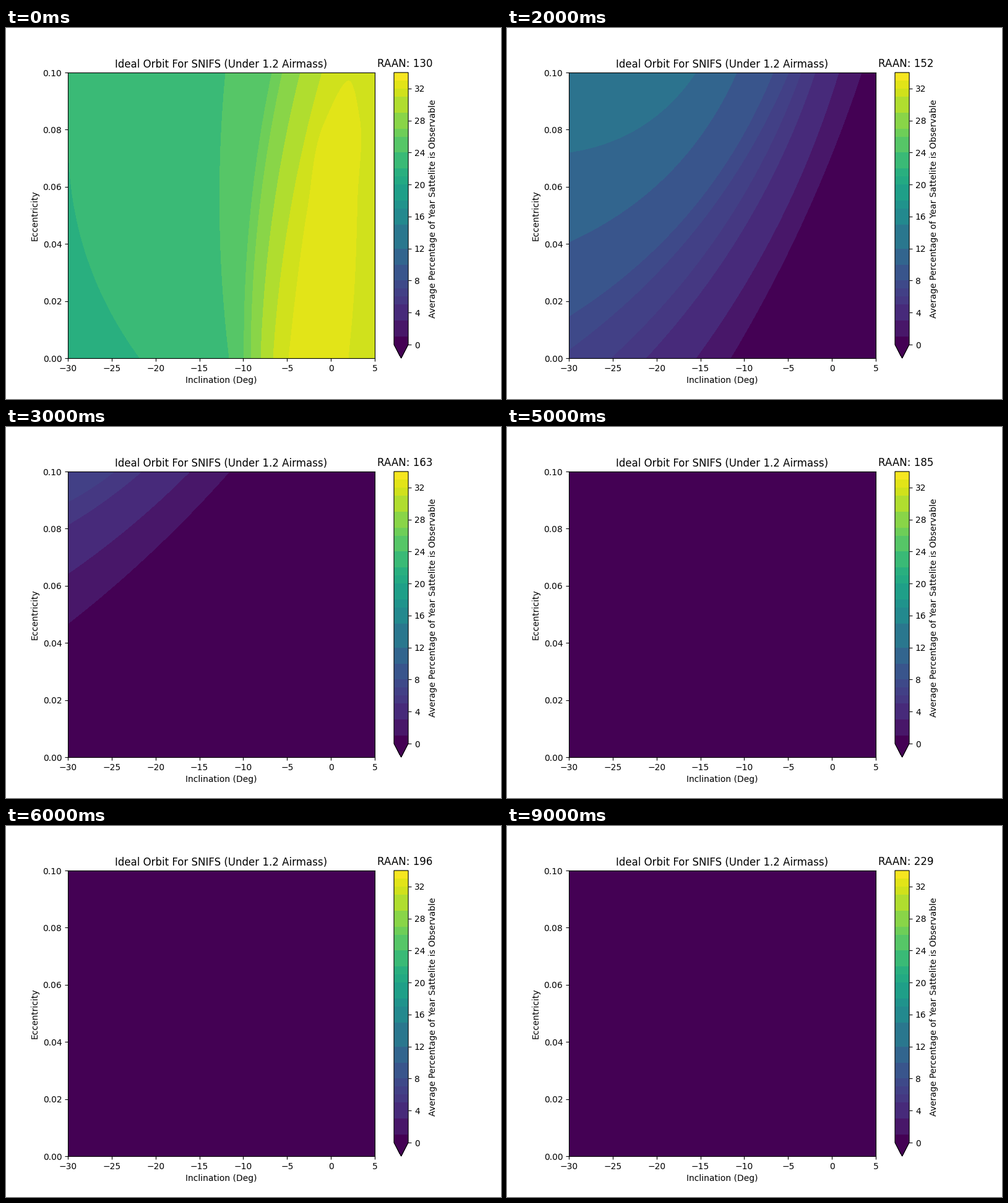
A matplotlib script that plays this animation: 800 by 600 pixels, repeating every 10000 ms.

```python
import numpy as np
import matplotlib.pyplot as plt
from matplotlib.animation import FuncAnimation
from matplotlib.cm import ScalarMappable
from matplotlib.colors import BoundaryNorm, ListedColormap
from matplotlib.patches import Polygon

plt.rcParams["font.family"] = "DejaVu Sans"

FRAMES, INTERVAL = 10, 1000
LEFT, RIGHT, TOP, BOTTOM = 100, 596, 72, 534
TL, TR, BL, BR = (LEFT, TOP), (RIGHT, TOP), (LEFT, BOTTOM), (RIGHT, BOTTOM)
PEAK = 34
viridis = plt.get_cmap("viridis")


def shade(value):
    return viridis(value / PEAK if value > 1 else 0.0)


def to_data(points):
    x, y = np.asarray(points, float).T
    return np.column_stack([-30 + (x - LEFT) * 35 / (RIGHT - LEFT),
                            (BOTTOM - y) * 0.1 / (BOTTOM - TOP)])


def arc(start, end, bow):
    """Parabola over a chord; bow is its height as a share of the chord."""
    a, b = np.array(start, float), np.array(end, float)
    t = np.linspace(0, 1, 60)[:, None]
    dx, dy = b - a
    return a + (b - a) * t + 4 * bow * t * (1 - t) * np.array([dy, -dx])


def bowl(floor, rim, mix, center=160):
    """Blend of a parabola and an ellipse from the left edge up to the rim."""
    x = np.linspace(LEFT, rim, 200)
    f = (x - center) / (rim - center)
    rise = mix * f**2 + (1 - mix) * (1 - np.sqrt(1 - f**2))
    return np.column_stack([x, floor - (floor - TOP) * rise])


def smooth(points, steps=16):
    """Cubic Hermite curve through key points, by chord length."""
    p = np.array(points, float)
    s = np.r_[0, np.cumsum(np.hypot(*np.diff(p, axis=0).T))]
    m = np.gradient(p, s, axis=0)
    u = np.linspace(0, 1, steps)[:, None]
    ease = 3 * u**2 - 2 * u**3
    return np.vstack([
        p[i] + (p[i + 1] - p[i]) * ease
        + h * (u * (1 - u)**2 * m[i] - u**2 * (1 - u) * m[i + 1])
        for i, h in enumerate(np.diff(s))])


def foot(d):
    """Point d along the bottom from the lower left corner; negative goes up."""
    return LEFT + max(d, 0), BOTTOM + min(d, 0)


fig, ax = plt.subplots(figsize=(8, 6), dpi=100)
ax.set(xlim=(-30, 5), ylim=(0, 0.1), xlabel="Inclination (Deg)",
       ylabel="Eccentricity", title="Ideal Orbit For SNIFS (Under 1.2 Airmass)")

edges = [0, 1, 3, 5, 6, 7, 8, 10, 12, 15, 17, 18, 20, 21, 22, 24,
         26, 27, 29, 31, 32, 33, PEAK]
colors = [shade((a + b) / 2) for a, b in zip(edges, edges[1:])]
cmap = ListedColormap(colors).with_extremes(under=colors[0])
bar = fig.colorbar(ScalarMappable(BoundaryNorm(edges, len(colors)), cmap), ax=ax,
                   extend="min", spacing="proportional", ticks=range(0, PEAK, 4),
                   label="Average Percentage of Year Sattelite is Observable")
bar.minorticks_off()
raan = ax.text(5.28, 0.102, "", fontsize=12)

base = [23, 14] + [0] * (FRAMES - 2)
regions = [[] for _ in range(FRAMES)]


def region(frame, value, path, *corners):
    points = np.vstack([path, *corners])
    patch = Polygon(to_data(points), facecolor=shade(value), linewidth=0,
                    antialiased=False, visible=False)
    ax.add_patch(patch)
    regions[frame].append(patch)


# RAAN 130: steep bands and a tall ridge on the right
region(0, 21.5, arc((LEFT, 190), (215, BOTTOM), -0.08), BL)
for value, top, bottom in [(25, 355, 361), (26.5, 430, 385), (28, 447, 396),
                           (30, 476, 412), (31.5, 511, 432)]:
    region(0, value, arc((top, TOP), (bottom, BOTTOM), -0.027), BR, TR)
region(0, 32.5, smooth([(457, BOTTOM), (468, 435), (488, 290), (515, 153),
                        (555, 86), (571, 145), (568, 270), (561, 445),
                        (553, BOTTOM)]))

# RAAN 141: bowls in the upper left, nested ridges in the lower right
for value, floor, rim, mix in [(16, 487, 550, 0.6), (17.5, 307, 481, 0.8),
                               (18.5, 195, 412, 1)]:
    region(1, value, bowl(floor, rim, mix), TL)
region(1, 16, smooth([(RIGHT, 179), (567, 190), (523, 268), (501, 345),
                      (494, 430), (459, BOTTOM)]), BR)
region(1, 17.5, smooth([(485, BOTTOM), (522, 450), (528, 375), (565, 321),
                        (586, 390), (RIGHT, 465)]), BR)
region(1, 18.5, smooth([(512, BOTTOM), (541, 465), (553, 424), (563, 432),
                        (554, 470), (548, BOTTOM)]))

# RAAN 152: diagonal bands, more curved as the value grows
for value, top, d in [(2, 573, 261), (4, 536, 205), (5.5, 498, 124),
                      (6.5, 475, 67), (7.5, 455, -14), (9, 430, -68),
                      (11, 371, -188), (13, 305, -333)]:
    region(2, value, arc((top, TOP), foot(d), 0.0125 + 0.0075 * value), BL, TL)

# RAAN 163: only the upper left corner is left
for value, top, d in [(2, 361, -216), (4, 297, -297), (5.5, 219, -376),
                      (6.5, 175, -413)]:
    region(3, value, arc((top, TOP), foot(d), 0.023), TL)


def update(frame):
    ax.set_facecolor(shade(base[frame]))
    for i, patches in enumerate(regions):
        for patch in patches:
            patch.set_visible(i == frame)
    raan.set_text(f"RAAN: {130 + 11 * frame}")
    return []


anim = FuncAnimation(fig, update, frames=FRAMES, interval=INTERVAL,
                     repeat=True, repeat_delay=0, blit=False)
plt.show()
```
